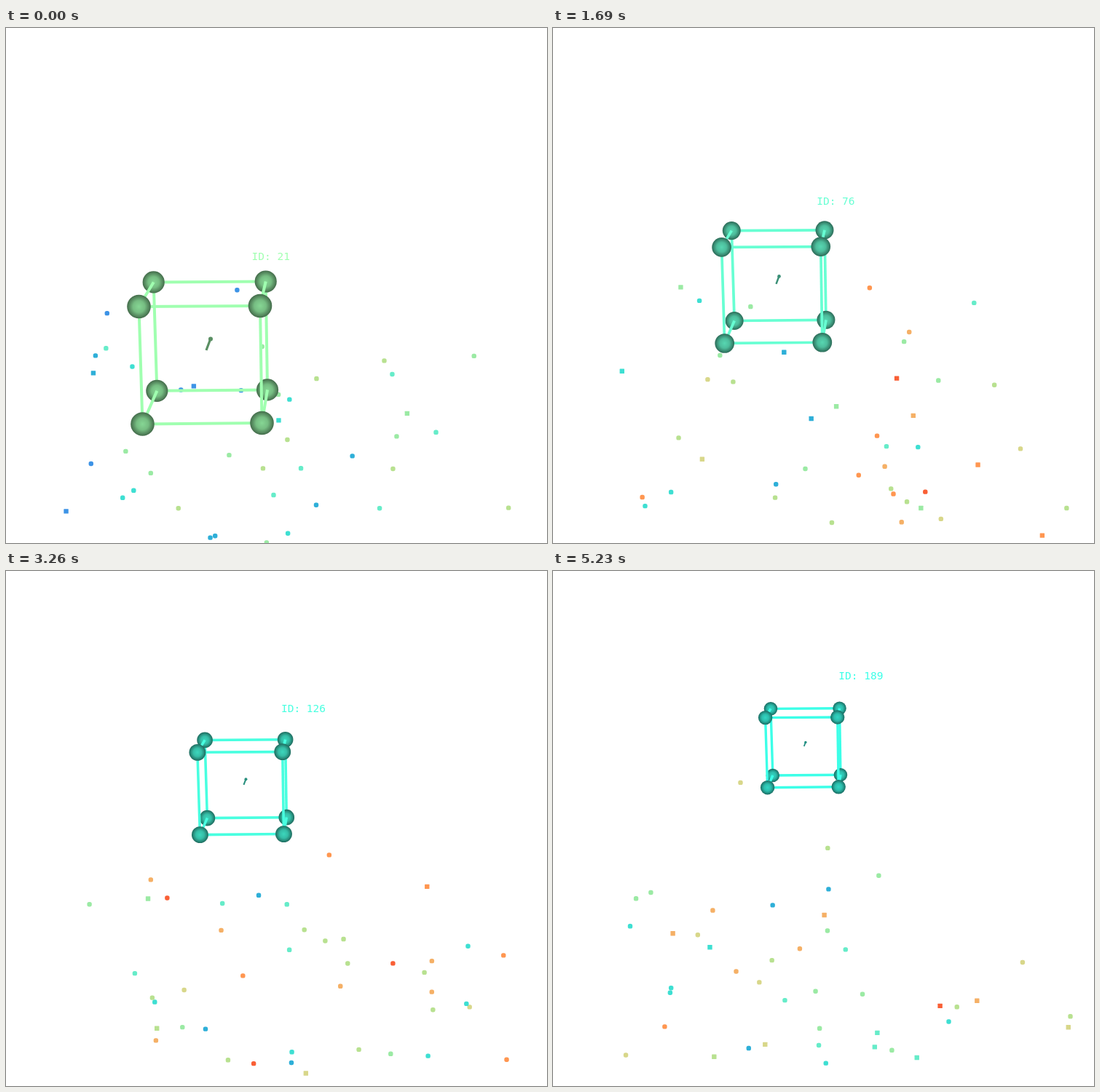
Write an HTML page with a canvas that moves like this. It is 743 by 708 pixels and loops after 5300 ms.

```html
<!DOCTYPE html>
<html lang="en">
<head>
<meta charset="utf-8">
<title>Tracked box in a point cloud</title>
<style>
  html, body { margin: 0; width: 100%; height: 100%; overflow: hidden; background: #fff; }
  canvas { display: block; }
</style>
</head>
<body>
<canvas id="stage" width="743" height="708"></canvas>
<script>
const ctx = document.getElementById('stage').getContext('2d');
const LOOP = 5300, STEPS = 78;

// Front corners at depth 1: top left, top right, bottom right, bottom left.
const corners = [[182.5, 383], [349, 382], [351.5, 543], [187.5, 544.5]];
const vanish = [452, -65];
const palette = ['#3d93e6', '#2eafd8', '#3edfd2', '#66ecc9', '#9beaa4',
  '#b8e190', '#d8d78a', '#f5b066', '#ff9650', '#f95f35'];

// Box colour over the steps: step, red, green, blue.
const tints = [
  [0, 160, 255, 176], [11, 64, 255, 226], [19, 124, 255, 203], [31, 84, 255, 218],
  [48, 72, 255, 224], [59, 0, 216, 255], [77, 60, 255, 232]
];

const project = ([x, y], depth, [vx, vy] = vanish) =>
  [vx + (x - vx) / depth, vy + (y - vy) / depth];

const shade = (color, k) => `rgb(${color.map(c => Math.round(c * k)).join()})`;

function tintAt(step) {
  const n = Math.max(1, tints.findIndex(k => k[0] >= step));
  const [a, b] = [tints[n - 1], tints[n]];
  const p = (step - a[0]) / (b[0] - a[0]);
  return [1, 2, 3].map(c => a[c] + (b[c] - a[c]) * p);
}

function seeded(seed) {
  let s = seed * 7919 + 12345;
  return () => {
    s = (s + 0x6D2B79F5) | 0;
    let v = Math.imul(s ^ (s >>> 15), 1 | s);
    v = (v + Math.imul(v ^ (v >>> 7), 61 | v)) ^ v;
    return ((v ^ (v >>> 14)) >>> 0) / 4294967296;
  };
}

function drawCloud(step) {
  const rnd = seeded(step + 1);
  for (let n = 0; n < 43; n++) {
    const x = 30 + 710 * (0.65 * rnd() + 0.35 * rnd());
    const y = 708 - 260 * rnd() ** 1.2 - 160 * rnd() ** 4;
    const hue = step < 5 ? rnd() * 6 : rnd() < 0.05 ? 1 : 2 + rnd() * 7.5;
    ctx.fillStyle = palette[Math.floor(hue)];
    ctx.beginPath();
    ctx.roundRect(x - 3.2, y - 3.2, 6.4, 6.4, rnd() < 0.25 ? 0.5 : 2.6);
    ctx.fill();
  }
}

function line(a, b) {
  ctx.beginPath();
  ctx.moveTo(...a);
  ctx.lineTo(...b);
  ctx.stroke();
}

const drawFace = pts => pts.forEach((p, n) => line(p, pts[(n + 1) % 4]));

function drawBall([x, y], r, color) {
  const g = ctx.createRadialGradient(x, y, 0, x, y, r);
  g.addColorStop(0, shade(color, 0.84));
  g.addColorStop(0.5, shade(color, 0.74));
  g.addColorStop(1, shade(color, 0.42));
  ctx.fillStyle = g;
  ctx.beginPath();
  ctx.arc(x, y, r, 0, 7);
  ctx.fill();
}

function drawArrow(depth, color) {
  const [x, y] = project([278, 435], depth, [445.5, -51]);
  const k = 1 / depth ** 2;
  ctx.strokeStyle = ctx.fillStyle = shade(color, 0.56);
  ctx.lineWidth = 1 + 2.2 * k;
  line([x - 3 * k, y + 8 * k], [x + 3 * k, y - 8 * k]);
  ctx.beginPath();
  ctx.arc(x + 3 * k, y - 7.5 * k, 1 + 2 * k, 0, 7);
  ctx.fill();
}

function drawBox(step) {
  const count = step && Math.round(2.18 * step + 0.55);
  const depth = 1 + 0.00405 * count, backDepth = depth + 0.081;
  const color = tintAt(step);
  const front = corners.map(c => project(c, depth));
  const back = corners.map(c => project(c, backDepth));

  drawArrow(depth, color);
  ctx.strokeStyle = shade(color, 1);
  ctx.lineWidth = 2.5 + 1.5 / depth;
  drawFace(back);
  back.forEach(p => drawBall(p, 16.3 / backDepth, color));
  front.forEach((p, n) => line(p, back[n]));
  drawFace(front);
  front.forEach(p => drawBall(p, 16.3 / depth, color));

  ctx.fillStyle = shade(color, 1);
  ctx.font = '14.5px "DejaVu Sans Mono", monospace';
  ctx.fillText('ID: ' + (21 + count), ...project([337.5, 319], depth, [473, -100.4]));
}

function draw(now) {
  const time = now % LOOP;
  const step = Math.min(STEPS - 1, Math.floor(time * STEPS / LOOP + 0.12));
  ctx.fillStyle = '#fff';
  ctx.fillRect(0, 0, 743, 708);
  drawCloud(step);
  drawBox(step);
}

const start = performance.now();
function tick() {
  draw(performance.now() - start);
  requestAnimationFrame(tick);
}
tick();
</script>
</body>
</html>
```
